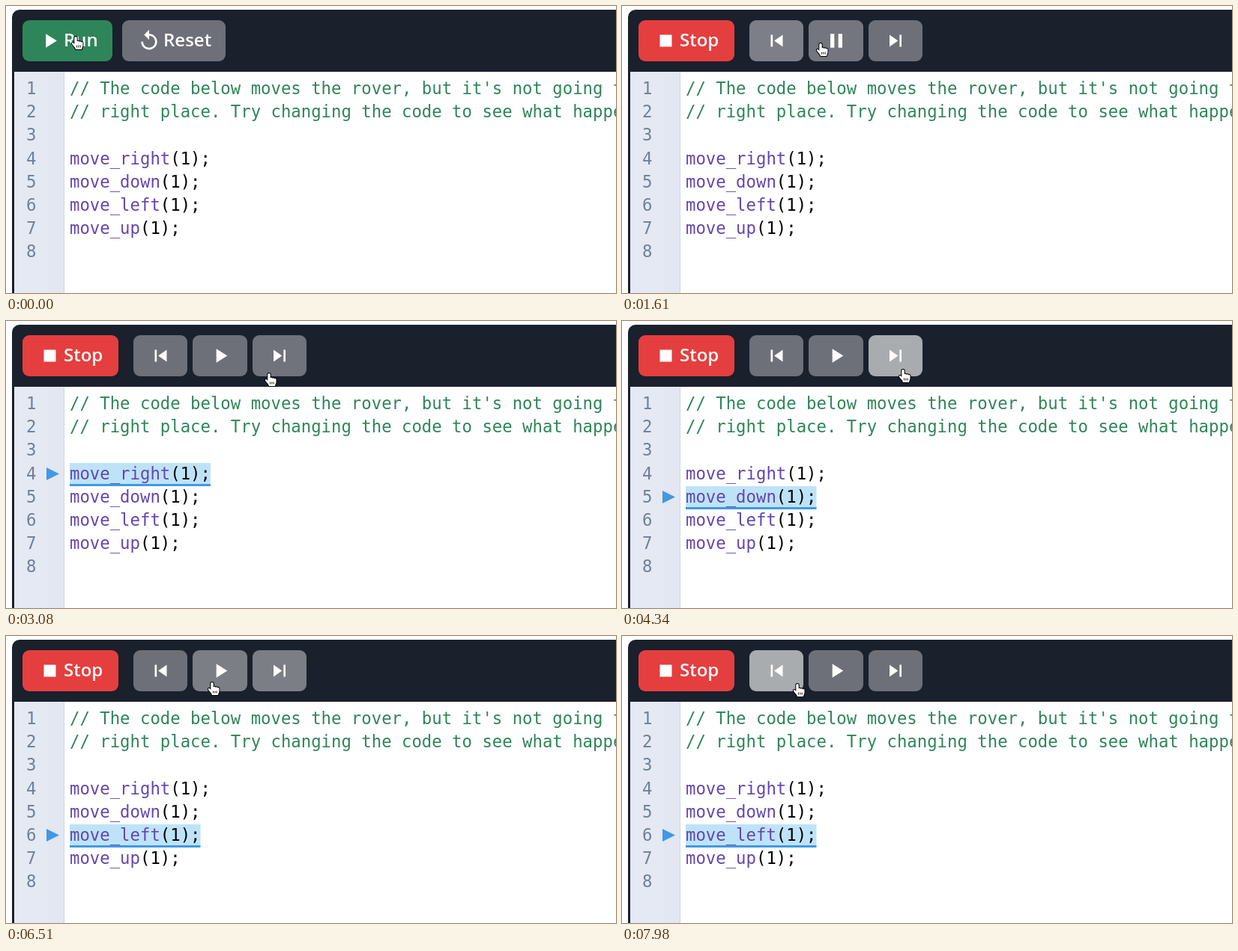
Write an HTML page with a canvas that moves like this. It is 814 by 384 pixels and loops after 8 s.

```html
<!DOCTYPE html>
<html lang="en">
<head>
<meta charset="utf-8">
<title>Code stepper</title>
<style>
html, body { margin: 0; width: 100%; height: 100%; overflow: hidden; background: #fff; }
canvas { display: block; }
</style>
</head>
<body>
<canvas id="stage" width="814" height="384"></canvas>
<script>
const ctx = document.getElementById('stage').getContext('2d');
const LOOP = 8000, STEP = 70, FADE = 200;
const MONO = '22.3px "DejaVu Sans Mono", monospace';
const LABEL = '600 24px "Open Sans", sans-serif';
const PURPLE = '#6346b0', GREEN = '#2f855a', BLUE = '#4299e1';

// Icons on a 24 unit grid
const icons = {
  play: 'M8 5v14l11-7z',
  stop: 'M6 6h12v12H6z',
  pause: 'M6 19h4V5H6zM14 5v14h4V5z',
  prev: 'M6 6h2v12H6zM9.5 12l8.5 6V6z',
  next: 'M6 18l8.5-6L6 6zM16 6v12h2V6z',
  reset: 'M12 5V1L7 6l5 5V7c3.3 0 6 2.7 6 6s-2.7 6-6 6-6-2.7-6-6H4c0 4.4 3.6 8 8 8s8-3.6 8-8-3.6-8-8-8z'
};
for (const k in icons) icons[k] = new Path2D(icons[k]);

const hand = new Path2D('M-1.7 1.6a1.7 1.7 0 0 1 3.4 0V6.6a1.5 1.5 0 0 1 2.8.4a1.4 1.4 0 0 1 2.6.6' +
  'a1.3 1.3 0 0 1 2.4.9V11.5c0 2.5-1.3 3-1.5 5.5H0C-.5 14.5-3.6 12.2-5 9.8C-5.7 8.2-4 7.4-3 8.5L-1.7 10Z');
const creases = new Path2D('M1.6 11.5v3M3.9 11.5v3M6.2 11.5v3');

// Pointer tip: time, x, y
const path = [
  [0, 93, 41], [1050, 93, 41], [1190, 128, 43], [1500, 241, 47], [1570, 249, 48], [1610, 265, 50],
  [1750, 283, 55], [2450, 283, 55], [2730, 300, 80], [2940, 335, 79], [3060, 348, 75],
  [3080, 351, 70], [3220, 374, 65.5], [3290, 375, 65], [6230, 375, 65], [6400, 331, 64],
  [6510, 275, 62], [6720, 243, 63], [6930, 234, 64], [LOOP, 234, 64]
];

// Ring shown from, ring hidden at, button released at
const clicks = {
  run: [420, 770, 770],
  pause: [1960, 2100, 2170],
  next: [3920, 4270, 4340],
  next2: [5320, 5740, 5810],
  prev: [7490, 7910, LOOP]
};
const RUNNING = 1050, PAUSED = clicks.pause[2];

const GRAY = [109, 112, 121], LIFT = [30, 30, 27];
const run = { x: 22, w: 120, icon: 'play', ix: 58.5, label: 'Run', tx: 77, color: [47, 133, 90], press: [9, 28, 15], clicks: ['run'] };
const reset = { x: 155, w: 138, icon: 'reset', ix: 191, label: 'Reset', tx: 210, color: GREY_OR(GRAY), clicks: [] };
const stop = { x: 22, w: 128, icon: 'stop', ix: 58.5, label: 'Stop', tx: 77, color: [229, 62, 62], hover: [16, 39, 39], clicks: [] };
const prev = { x: 170, w: 72, icon: 'prev', ix: 206.5, color: GRAY, hover: LIFT, press: LIFT, clicks: ['prev'] };
const pause = { x: 249, w: 73, icon: 'pause', ix: 286, color: GRAY, hover: LIFT, press: LIFT, clicks: ['pause'] };
const next = { x: 329, w: 72, icon: 'next', ix: 365, color: GRAY, hover: LIFT, press: LIFT, clicks: ['next', 'next2'] };

function GREY_OR(c) { return c; }

function pointer(t) {
  const i = Math.max(1, path.findIndex(p => p[0] >= t));
  const [t0, x0, y0] = path[i - 1], [t1, x1, y1] = path[i];
  const k = Math.max(0, (t - t0) / (t1 - t0));
  return [x0 + (x1 - x0) * k, y0 + (y1 - y0) * k];
}

function isOver(b, t) {
  const [x, y] = pointer(t);
  return t >= RUNNING && x >= b.x && x <= b.x + b.w && y >= 19 && y <= 74;
}

const isPressed = (b, t) => b.clicks.some(c => t >= clicks[c][0] && t < clicks[c][2]);

// Linear fade: share of the last FADE ms in which the test held
function level(test, b, t) {
  let n = 0;
  for (let d = 5; d < FADE; d += 10) if (test(b, t - d)) n++;
  return n * 10 / FADE;
}

function text(s, x, y, color, font) {
  ctx.font = font;
  ctx.fillStyle = color;
  ctx.fillText(s, x, y);
}

function rect(x, y, w, h, color) {
  ctx.fillStyle = color;
  ctx.fillRect(x, y, w, h);
}

function button(b, t, icon = b.icon) {
  const h = b.hover ? level(isOver, b, t) : 0;
  const p = b.press ? level(isPressed, b, t) : 0;
  const rgb = b.color.map((c, i) => c + (h && b.hover[i] * h) + (p && b.press[i] * p));
  ctx.fillStyle = `rgb(${rgb.map(Math.round)})`;
  ctx.beginPath();
  ctx.roundRect(b.x, 19, b.w, 55, 9);
  ctx.fill();
  ctx.save();
  ctx.translate(b.ix - 16, 30.5);
  ctx.scale(4 / 3, 4 / 3);
  ctx.fillStyle = '#fff';
  ctx.fill(icons[icon]);
  ctx.restore();
  if (b.label) text(b.label, b.tx, 54, '#fff', LABEL);
}

function editor(line) {
  rect(8, 80, 3, 304, '#1a202c');
  rect(11, 88, 45, 296, '#e4e9f3');
  rect(56, 88, 21, 296, '#e2e7f1');
  rect(77, 88, 1, 296, '#cfd6e2');
  const rows = [
    "// The code below moves the rover, but it's not going to the",
    '// right place. Try changing the code to see what happens.',
    '', 'move_right', 'move_down', 'move_left', 'move_up', ''
  ];
  rows.forEach((s, i) => {
    const y = 118 + 31.2 * i, isCall = s.startsWith('move');
    ctx.font = MONO;
    const w = ctx.measureText(s).width;
    if (i + 1 === line) {
      const top = Math.round(y - 21.6);
      rect(85, top, w + ctx.measureText('(1);').width, 28, '#bee3f8');
      rect(85, top + 28, w + ctx.measureText('(1);').width, 3, BLUE);
      ctx.beginPath();
      ctx.moveTo(54, top + 6);
      ctx.lineTo(71, top + 14.5);
      ctx.lineTo(54, top + 23);
      ctx.fill();
    }
    text(i + 1, 27, y, '#718096', MONO);
    text(s, 85, y, isCall ? PURPLE : GREEN, MONO);
    if (isCall) text('(1);', 85 + w, y, '#000', MONO);
  });
}

function circle(x, y, r, width, color) {
  ctx.beginPath();
  ctx.arc(x, y, r, 0, 7);
  ctx.lineWidth = width;
  ctx.strokeStyle = color;
  ctx.stroke();
}

function cursor(t) {
  const [x, y] = pointer(t);
  if (Object.values(clicks).some(c => t >= c[0] && t < c[1])) {
    circle(x, y, 28.5, 6, '#000');
    circle(x, y, 28.3, 2.5, '#fff');
  }
  ctx.save();
  ctx.translate(x, y);
  ctx.lineJoin = 'round';
  ctx.strokeStyle = '#000';
  ctx.fillStyle = '#fff';
  ctx.lineWidth = 2;
  ctx.stroke(hand);
  ctx.fill(hand);
  ctx.lineWidth = 0.9;
  ctx.stroke(creases);
  ctx.restore();
}

function draw(t) {
  rect(0, 0, 814, 384, '#fff');
  ctx.fillStyle = '#1a202c';
  ctx.beginPath();
  ctx.roundRect(8, 5, 830, 83, [10, 0, 0, 0]);
  ctx.fill();
  const line = t < PAUSED ? 0 : 4 + (t >= clicks.next[2]) + (t >= clicks.next2[2]);
  editor(line);
  if (t < RUNNING) {
    button(run, t);
    button(reset, t);
  } else {
    button(stop, t);
    button(prev, t);
    button(pause, t, t < PAUSED ? 'pause' : 'play');
    button(next, t);
  }
  cursor(t);
}

function tick() {
  const t = performance.now() % LOOP;
  draw(Math.floor(t / STEP) * STEP);
  requestAnimationFrame(tick);
}
tick();
</script>
</body>
</html>
```
